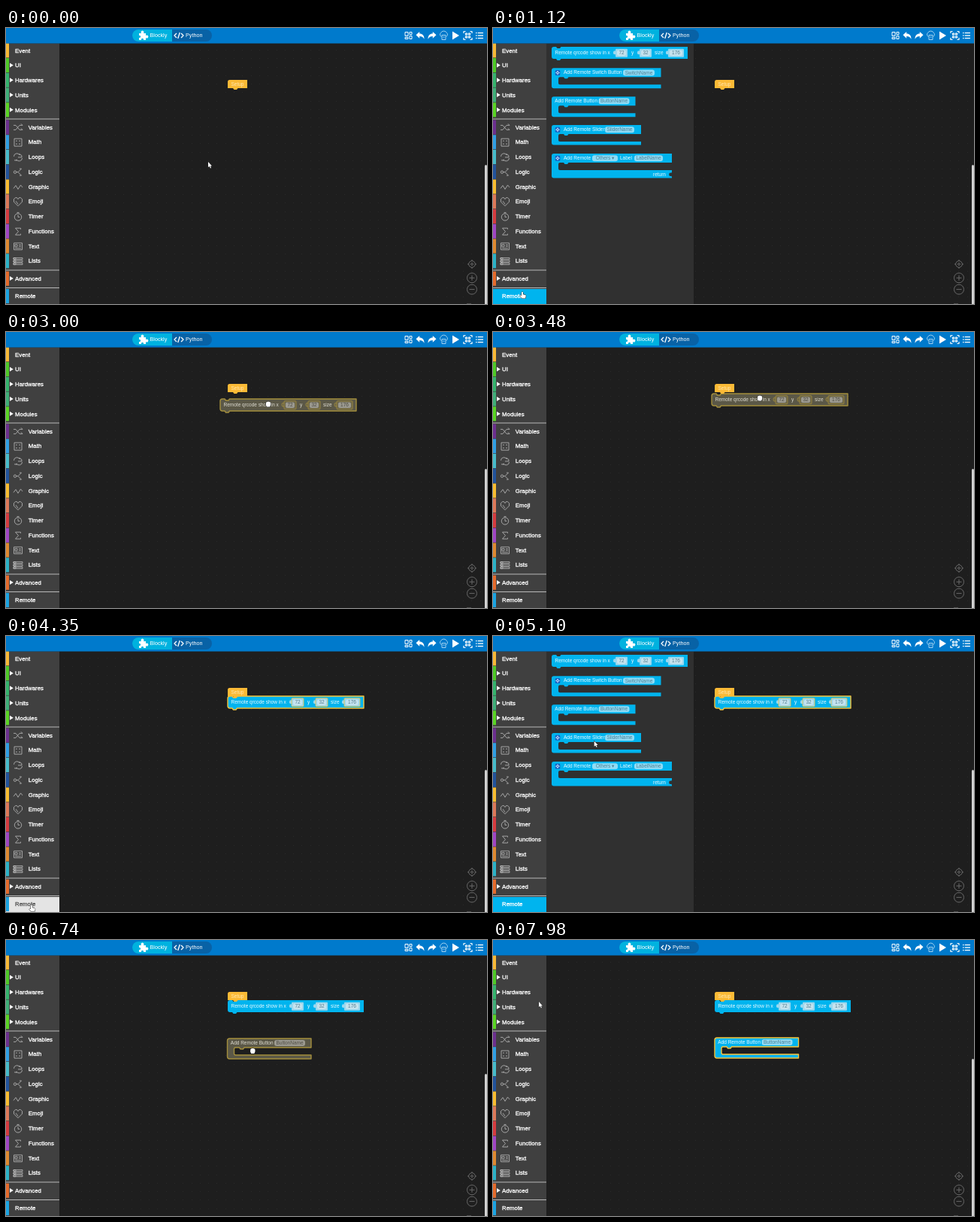
Write an HTML page with a canvas that moves like this. It is 640 px wide and 367 px high and loops after 8 s.

```html
<!DOCTYPE html>
<html lang="en">
<head>
<meta charset="utf-8">
<title>Block editor</title>
<style>
  html, body { margin: 0; width: 100%; height: 100%; overflow: hidden; background: #1e1e1e; }
  canvas { display: block; width: 100vw; height: 100vh; }
</style>
</head>
<body>
<canvas id="stage" width="640" height="367"></canvas>
<script>
const ctx = document.getElementById('stage').getContext('2d');
const LOOP = 8000, TICK = 124.7, TICK_OFFSET = 24;   // the screen refreshes in ticks
const CYAN = '#00b4ee';

// ---------- helpers ----------
function rect(x, y, w, h, color) { ctx.fillStyle = color; ctx.fillRect(x, y, w, h); }

function pill(x, y, w, h, r, color, edge) {
  ctx.beginPath();
  ctx.roundRect(x, y, w, h, r);
  ctx.fillStyle = color;
  ctx.fill();
  if (edge) { ctx.strokeStyle = edge; ctx.lineWidth = 0.8; ctx.stroke(); }
}

function text(str, x, y, size, color, { align = 'left', weight = 0 } = {}) {
  ctx.font = `${size}px "Liberation Sans", Arial, sans-serif`;
  ctx.textAlign = align;
  ctx.textBaseline = 'middle';
  ctx.fillStyle = ctx.strokeStyle = color;
  ctx.fillText(str, x, y);
  if (weight) { ctx.lineWidth = weight; ctx.strokeText(str, x, y); }
}

function shape(d, x, y, { fill, stroke, width = 0.9 } = {}) {
  const path = new Path2D(d);
  ctx.save();
  ctx.translate(x, y);
  ctx.lineJoin = 'round';
  if (stroke) { ctx.strokeStyle = stroke; ctx.lineWidth = width; ctx.stroke(path); }
  if (fill) { ctx.fillStyle = fill; ctx.fill(path); }
  ctx.restore();
}

const ring = (r, x = 0, y = 0) => `M${x + r} ${y}a${r} ${r} 0 1 1 ${-2 * r} 0a${r} ${r} 0 1 1 ${2 * r} 0`;
const box = (x, y, w, h = w) => `M${x} ${y}h${w}v${h}h${-w}z`;

// keys: [tick, x, y], straight between neighbours
function along(keys, tick) {
  const next = keys.findIndex(k => k[0] > tick);
  if (next === 0) return keys[0].slice(1);
  if (next < 0) return keys[keys.length - 1].slice(1);
  const [a, b] = [keys[next - 1], keys[next]];
  const f = (tick - a[0]) / (b[0] - a[0]);
  return [a[1] + (b[1] - a[1]) * f, a[2] + (b[2] - a[2]) * f];
}

// ---------- header ----------
function drawHeader() {
  rect(0, 0, 640, 20.5, '#007acc');
  pill(168, 2, 106, 16, 8, '#0862a6');
  pill(168, 2, 53, 16, [8, 0, 0, 8], '#00b2df');
  shape('M-5-3h3a2 2 0 1 1 3 0h3v3a2 2 0 1 1 0 3v3h-3a1.6 1.6 0 1 0-3 0h-3v-3a1.6 1.6 0 1 0 0-3z', 182, 10, { fill: '#fff' });
  text('Blockly', 191.5, 10.5, 7.2, '#fff');
  shape('M-3-3l-3 3 3 3M3-3l3 3-3 3M1.3-4l-2.6 8', 230, 10, { stroke: '#fff', width: 1.3 });
  text('Python', 239, 10.5, 7.2, '#fff');

  shape(box(-4.5, -4.5, 4, 5) + box(1.5, -4.5, 3) + box(1.5, 0.5, 3, 4) + box(-4.5, 2.5, 4, 2),
    535.5, 10, { stroke: '#fff', width: 1 });
  const turn = 'M-5.5-.7l4.7-4.3v2.6C3-2.4 5.5 0 5.5 4.8 4 2 2 1-.8 1v2.7z';
  shape(turn, 551, 10, { fill: '#fff' });
  ctx.save();
  ctx.translate(567, 10);
  ctx.scale(-1, 1);
  shape(turn, 0, 0, { fill: '#fff' });
  ctx.restore();
  shape('M-3 1.5a3 3 0 0 1-1-5A4.5 4.5 0 0 1 4-3.5a3 3 0 0 1-1 5M-2.5-.5h5v6h-5zM-1 2h2', 582.5, 10, { stroke: '#b4daf3' });
  shape('M-4-5.5L5 0l-9 5.5z', 598, 10, { fill: '#fff' });
  for (let turns = 0; turns < 4; turns++) {
    ctx.save();
    ctx.translate(614.5, 10);
    ctx.rotate(turns * Math.PI / 2);
    shape('M-5.5-3v-2.5H-3' + box(-3, -3, 2), 0, 0, { stroke: '#fff', width: 1.2 });
    ctx.restore();
  }
  for (const y of [6.5, 10, 13.5]) {
    rect(625, y - 0.6, 1.5, 1.3, '#fff');
    rect(627.7, y - 0.6, 7.3, 1.3, '#fff');
  }
}

// ---------- toolbox ----------
const LINE_ICONS = {
  Variables: 'M-6-3h3l5 6h4l-2-2M-6 3h3L2-3h4l-2-2',
  Loops: 'M-5.5-1a4 4 0 0 1 7.5-2v-2M5.5 1a4 4 0 0 1-7.5 2v2M-5 4h3M2-4q4 1 3 4H0',
  Graphic: 'M-6 2l3-4 3 5 3.5-5.5L6 .5',
  Emoji: 'M0 5.5L-5.5 0v-3.5l2-2h2l1.5 2 1.5-2h2l2 2V0zM0 3L-3-1',
  Functions: 'M3.5-3v-1.5h-7L.5 0l-4 4.5h7V3',
};
const ROUND_ICONS = {
  Math: box(-5, -5, 10) + 'M-3-2h2M1-2h2M-3 2h2M1 2h2',
  Logic: ring(1.7, -4) + 'M-2.3 0H0L4.5-4.5H2M0 0l4.5 4.5H2',
  Timer: ring(4.7, 0, 0.5) + 'M0-2.5v3h2.3M-1.5-5.5h3',
  Text: box(-5.5, -4.5, 11, 9) + box(-4, -2.5, 3) + 'M1-2h3M1 0h3M-4 2.5h8',
  Lists: [-4.5, -1, 2.5].map(y => box(-6, y, 12, 2) + box(-6, y, 3, 2)).join(''),
};
const ICONS = { ...LINE_ICONS, ...ROUND_ICONS };

const PITCH = 19.75;
const column = (top, entries) => entries.map(([name, color, folds], i) =>
  ({ name, color, folds, top: top + i * PITCH }));
const ROWS = [
  ...column(20.3, [['Event', '#f8b936'], ['UI', '#4fc927', true], ['Hardwares', '#35b36d', true],
    ['Units', '#3fae78', true], ['Modules', '#5ad424', true]]),
  ...column(122.5, [['Variables', '#6c2f8f'], ['Math', '#2f9fe4'], ['Loops', '#46bccb'],
    ['Logic', '#21539c'], ['Graphic', '#f9bd30'], ['Emoji', '#dd7858'], ['Timer', '#d53b3f'],
    ['Functions', '#a045c4'], ['Text', '#df8930'], ['Lists', '#2bb2c7']]),
  ...column(323.7, [['Advanced', '#e56b2c', true]]),
  ...column(347, [['Remote', '#1ba4e2']]),
];

function drawToolbox(remote) {
  rect(0, 20.5, 71, 347, '#404040');
  for (const { name, color, folds, top } of ROWS) {
    const mid = top + PITCH / 2, state = name === 'Remote' ? remote : '';
    if (state) rect(0, top, 71, PITCH + 1, state === 'open' ? CYAN : '#e4e4e4');
    if (state !== 'open') rect(0, top, 4, PITCH - 0.7, color);
    if (folds) shape('M-2.2-3L2.6 0l-4.8 3z', 7.2, mid - 0.5, { fill: '#fff' });
    if (ICONS[name]) shape(ICONS[name], 16, mid, { stroke: '#bdbdbd', width: 0.8 });
    text(name, ICONS[name] ? 29.8 : 12, mid + 0.2, 7.85,
      state === 'hover' ? '#555' : '#fff', { weight: 0.3 });
  }
  for (const y of [120.5, 321.5, 345]) rect(0, y, 71, 1, '#b8b8b8');
}

// ---------- blocks ----------
const NORMAL = { body: CYAN, label: '#eefaff', socket: '#9ad8ef', field: '#c6e3ee', ink: '#527f92' };
const SELECTED = { ...NORMAL, edge: '#f6c43c' };
const DRAGGED = { body: '#5b5847', label: '#dedcd2', socket: '#6b6549', field: '#9c9a90', ink: '#4c4a42', edge: '#a48f3d' };

const commandPath = (w, h) =>
  `M0 3Q0 0 3 0H6l1.5 2h3.5l1.5-2H${w}V${h}H12.5l-1.5 2H7.5L6 ${h}H3Q0 ${h} 0 ${h - 3}z`;
const wrapPath = (w, foot) =>
  `M0 3Q0 0 3 0H${w}V12H22.5l-1.5 2h-3.5l-1.5-2H11Q9 12 9 14v6q0 2 2 2H${w}v${foot}H3q-3 0-3-3z`;

function drawBody(d, x, y, skin) {
  shape(d, x, y, { fill: skin.body });
  if (skin.edge) shape(d, x, y, { stroke: skin.edge, width: 1.4 });
}

const label = (str, x, y, skin) => text(str, x, y, 6.5, skin.label);

function nameField(str, x, y, w, skin) {
  pill(x, y - 4, w, 8, 3, skin === DRAGGED ? skin.field : '#8fdcf6');
  text(str, x + w / 2, y + 0.3, 6.5, skin.ink, { align: 'center' });
}

function numberField(str, x, y, w, skin) {
  pill(x, y - 3, 4, 5, 2, skin.socket, skin === DRAGGED && skin.edge);
  pill(x + 3, y - 5.5, w - 3, 11, 1, skin.socket, skin.edge);
  pill(x + 5, y - 3.7, w - 7, 7.4, 2, skin.field);
  text(str, x + w / 2 + 1.5, y + 0.3, 6.5, skin.ink, { align: 'center' });
}

function gear(x, y) {
  pill(x - 3.3, y - 3.5, 6.6, 7, 1.5, '#1461c4');
  shape(ring(1.4) + 'M0-2.6v1M0 1.6v1M-2.6 0h1M1.6 0h1', x, y, { stroke: '#e8f4ff' });
}

function qrBlock(x, y, skin) {
  drawBody(commandPath(181, 16), x, y, skin);
  const mid = y + 8.2;
  label('Remote qrcode show in x', x + 4.5, mid, skin);
  numberField('72', x + 82, mid, 19, skin);
  label('y', x + 106, mid, skin);
  numberField('32', x + 114, mid, 19, skin);
  label('size', x + 137, mid, skin);
  numberField('176', x + 152, mid, 24, skin);
}

function buttonBlock(x, y, skin) {
  drawBody(wrapPath(111.5, 5), x, y, skin);
  label('Add Remote Button', x + 4.3, y + 6, skin);
  nameField('ButtonName', x + 62.5, y + 6, 41, skin);
}

function gearBlock(y, w, foot, caption, field, fieldX, fieldW) {
  drawBody(wrapPath(w, foot), 78, y, NORMAL);
  gear(86, y + 6.2);
  label(caption, 94, y + 6.2, NORMAL);
  nameField(field, fieldX, y + 6.2, fieldW, NORMAL);
}

function setupBlock() {
  shape('M0 2.5Q0 0 2.5 0H26V11H13.5l-1.5 2H8.5L7 11H0z', 295, 69, { fill: '#fbba36' });
  text('Setup', 299.5, 75, 6.5, '#ffe6ae');
}

function drawFlyout() {
  rect(71, 20.5, 196, 347, '#303030');
  qrBlock(78, 25, NORMAL);
  gearBlock(53.3, 145.5, 5, 'Add Remote Switch Button', 'SwitchName', 173, 42);
  buttonBlock(78, 91.3, NORMAL);
  gearBlock(129, 119, 4.5, 'Add Remote Slider', 'SliderName', 149, 39);
  gearBlock(167, 160, 10.5, 'Add Remote', 'Others ▾', 132, 34);
  label('Label', 169, 173.2, NORMAL);
  nameField('LabelName', 188, 173.2, 38, NORMAL);
  label('return', 213, 194.8, NORMAL);
  shape('M0-3.5V3.5L-1 2q-3 1-3-2t3-2z', 238.2, 194.8, { fill: '#303030' });
}

// ---------- workspace ----------
function drawWorkspace(thumbTop) {
  rect(0, 0, 640, 367, '#1e1e1e');
  for (let y = 29; y < 367; y += 11.3)
    for (let x = 77; x < 636; x += 11.3) rect(Math.round(x), Math.round(y), 1, 1, '#2a2a2a');
  const gray = { stroke: '#686868', width: 1 };
  shape(ring(4.3) + ring(1.4) + 'M0-6v2M0 4v2M-6 0h2M4 0h2', 620, 314, gray);
  shape(ring(6.5) + 'M-3.5 0h7M0-3.5v7', 620, 332.3, gray);
  shape(ring(6.5) + 'M-3.5 0h7', 620, 347.6, gray);
  rect(613, 366, 6, 1, '#4c4c4c');
  pill(637, thumbTop, 3, 370 - thumbTop, 1.5, '#d2d2d2');
}

// ---------- pointer ----------
const POINTER = [
  [0, 269, 178], [2, 196, 238], [4, 56, 341], [5, 35, 348], [7, 39, 351], [9, 39, 351],
  [11, 82, 240], [13, 138, 74], [15, 142, 32], [16, 146, 36],
  [18, 169, 81], [20, 275, 114], [22, 333, 104], [24, 349, 96], [28, 355, 88],
  [30, 325, 121], [34, 54, 347], [35, 34, 358], [36, 34, 358],
  [39, 186, 207], [42, 109, 106], [43, 109, 106], [44, 112, 110], [46, 110, 106],
  [48, 195, 173], [51, 397, 165], [53, 330, 149], [57, 323, 143],
  [60, 293, 166], [61, 281, 152], [64, 61, 82],
];
const QR_DRAG = [[17, 81, 29], [18, 93, 55], [20, 211, 107], [22, 269, 97], [24, 285, 89], [27, 287, 86], [28, 291, 82]];
const BUTTON_DRAG = [[47, 88, 101], [48, 132, 145], [51, 365, 150], [53, 298, 134], [55, 291, 128]];
const MODES = [
  [0, 'arrow'], [4, 'point'], [10, 'arrow'], [16, 'grip'], [17, 'busy'], [19, 'grip'], [29, 'arrow'],
  [35, 'point'], [37, 'arrow'], [44, 'grip'], [47, 'busy'], [49, 'grip'], [58, 'arrow'],
];
const ARROW = 'M0 0V7.3L1.7 5.8 2.9 8.4 4 7.9 2.8 5.4H5z';
const FINGER = 'M-1 .5q1-1.5 2 0V3.2L4 4q1 .4.7 1.5L4 8.5H-.5L-3 5.3q.3-1.3 2-.2z';
const FIST = 'M-3-1.5q0-1.7 1.3-1.5.8-1 1.7-.3 1-.6 1.7.3 1.5 0 1.5 1.5V1L2 3.6h-4L-3.2 1z';

function drawPointer(tick) {
  const [x, y] = along(POINTER, tick);
  const mode = MODES.findLast(([from]) => tick >= from)[1];
  if (mode === 'busy') shape(ring(4), x + 2.3, y + 3.3, { stroke: '#e8e8e8', width: 1 });
  const outline = { point: FINGER, grip: FIST }[mode] || ARROW;
  shape(outline, x, y, { fill: '#fff', stroke: '#222', width: 1 });
}

// ---------- scene ----------
function draw(tick) {
  const during = (from, to) => tick >= from && tick < to;
  const flyoutOpen = during(9, 17) || during(36, 47);
  const hover = during(4, 9) || tick === 35;

  drawWorkspace(tick < 29 ? 182 : tick < 58 ? 178 : 158);
  if (during(17, 29)) qrBlock(...along(QR_DRAG, tick), DRAGGED);
  if (tick >= 29) qrBlock(295, 80, tick < 47 ? SELECTED : NORMAL);
  setupBlock();
  if (during(47, 58)) buttonBlock(...along(BUTTON_DRAG, tick), DRAGGED);
  if (tick >= 58) buttonBlock(295, 130, SELECTED);
  if (flyoutOpen) drawFlyout();
  drawToolbox(flyoutOpen ? 'open' : hover ? 'hover' : '');
  drawHeader();
  drawPointer(tick);
}

let shown = -1;
function frame() {
  const tick = Math.floor((performance.now() % LOOP + TICK_OFFSET) / TICK);
  if (tick !== shown) draw(shown = tick);
  requestAnimationFrame(frame);
}
frame();
</script>
</body>
</html>
```
